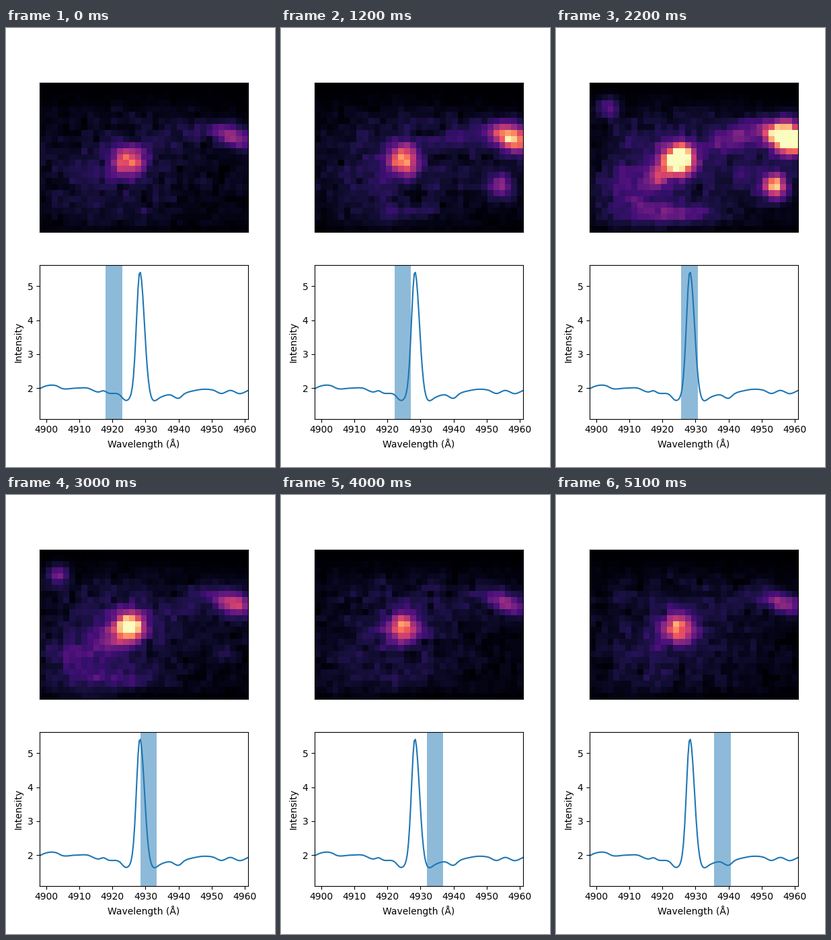
Animation of 400x650 px, one loop 5.2 s. Source, as a matplotlib script:

```python
import numpy as np
import matplotlib.pyplot as plt
from matplotlib.animation import FuncAnimation

FRAMES, INTERVAL = 52, 100
ROWS, COLS = 25, 35
START, STEP, WIDTH = 4918, .3467, 5          # moving band, in angstroms
PEAK = 4928.3

row, col = np.mgrid[:ROWS, :COLS].astype(float)


def bell(x, mid, width):
    return np.exp(-((x - mid) / width) ** 2 / 2)


def blob(cx, cy, sx, sy, tilt=0):
    a = np.radians(tilt)
    dx, dy = col - cx, row - cy
    along = dx * np.cos(a) + dy * np.sin(a)
    across = dy * np.cos(a) - dx * np.sin(a)
    return bell(along, 0, sx) * bell(across, 0, sy)


# Each source: steady brightness, extra brightness, frame of its maximum, shape
SOURCES = [
    (.63, .85, 24.5, blob(14.4, 12.5, 1.75, 1.65)),     # centre
    (.03, .32, 24.5, blob(10.8, 15.4, 1.3, 1.1, -35)),  # its tail
    (.42, 0, 0, blob(31.9, 8.5, 2.4, 1.1, 18)),         # right edge
    (0, 1.4, 19, blob(32.9, 8.9, 2.2, 1.7, 22)),
    (0, .95, 19, blob(30.6, 16.8, 1.2, 1.3)),           # lower right
    (0, .4, 26.5, blob(2.6, 3.8, 1.3, 1.2)),            # upper left
    (.06, .22, 20, blob(24.5, 8.4, 4, 1.6, -14)),       # bridge
    (.04, .2, 22, blob(14, 21.4, 4.5, 1.2)),            # diffuse light
    (.04, .16, 26, blob(6.5, 17.5, 4.2, 4.2)),
    (0, .12, 19, blob(28.5, 15.5, 4, 3.5)),
    (.06, .04, 24, blob(13.5, 12.5, 6, 5)),
]

# Fainter background near the top, the bottom and the far corners
shade = np.clip((row - .3) / 5, .06, 1) * np.clip((25.5 - row) / 3, 0, 1)
shade *= .35 + .65 * blob(14, 13, 13, 9)


def make_noise(window=14):
    """Noise averaged over a window that slides one slice per frame."""
    rng = np.random.default_rng(7)
    cube = rng.normal(size=(FRAMES + window, ROWS, COLS))
    cube += .35 * (np.roll(cube, 1, 1) + np.roll(cube, 1, 2))
    total = np.cumsum(cube, axis=0)
    mean = total[window:] - total[:-window]
    return mean / mean.std()


noise = make_noise()


def picture(frame):
    img = shade * (.06 + .03 * noise[frame])
    for steady, extra, mid, shape in SOURCES:
        power = steady + extra * bell(frame, mid, 5)
        img += power * shape * (1 + .04 * noise[frame])
    return img


def curve(x, px, py):
    """Cubic curve through the given points."""
    slope = np.gradient(py, px)
    i = np.clip(np.searchsorted(px, x) - 1, 0, len(px) - 2)
    h = px[i + 1] - px[i]
    t = (x - px[i]) / h
    return ((1 + 2 * t) * (1 - t) ** 2 * py[i] + t * (1 - t) ** 2 * h * slope[i]
            + t * t * (3 - 2 * t) * py[i + 1] - t * t * (1 - t) * h * slope[i + 1])


# Turning points of the continuum, in angstroms past 4900
CONTINUUM = np.array([
    (-2, 1.98), (-.6, 2.045), (3.1, 2.065), (4.7, 1.99), (8.6, 1.995),
    (12.4, 2), (15.9, 1.885), (17.3, 1.92), (18.7, 1.855), (22, 1.81),
    (24, 1.635), (26, 1.71), (29, 1.7), (32.5, 1.6), (34.6, 1.73),
    (37.3, 1.8), (40.2, 1.705), (41.7, 1.825), (44.8, 1.925), (47.8, 1.965),
    (50.4, 1.94), (52.9, 1.84), (55.6, 1.93), (58.5, 1.835), (61.3, 1.94),
])
wave = np.arange(4898, 4961.3, .35)
line = 3.72 * bell(wave, PEAK, np.where(wave < PEAK, 1.03, 1.35))
flux = curve(wave - 4900, *CONTINUUM.T) + line

fig, (top, low) = plt.subplots(2, 1, figsize=(4, 6.5), dpi=100)

image = top.imshow(picture(0), cmap="magma", vmin=0, vmax=1,
                   interpolation="nearest")
top.set(xticks=[], yticks=[])

low.plot(wave, flux)
band = low.axvspan(START, START + WIDTH, alpha=.5)
low.set(xlim=(4898, 4961), ylim=(1.097, 5.622),
        xlabel="Wavelength (Å)", ylabel="Intensity")


def update(frame):
    image.set_data(picture(frame))
    band.set_x(START + STEP * frame)
    return image, band


anim = FuncAnimation(fig, update, frames=FRAMES, interval=INTERVAL,
                     repeat=True, repeat_delay=0)
plt.show()
```
